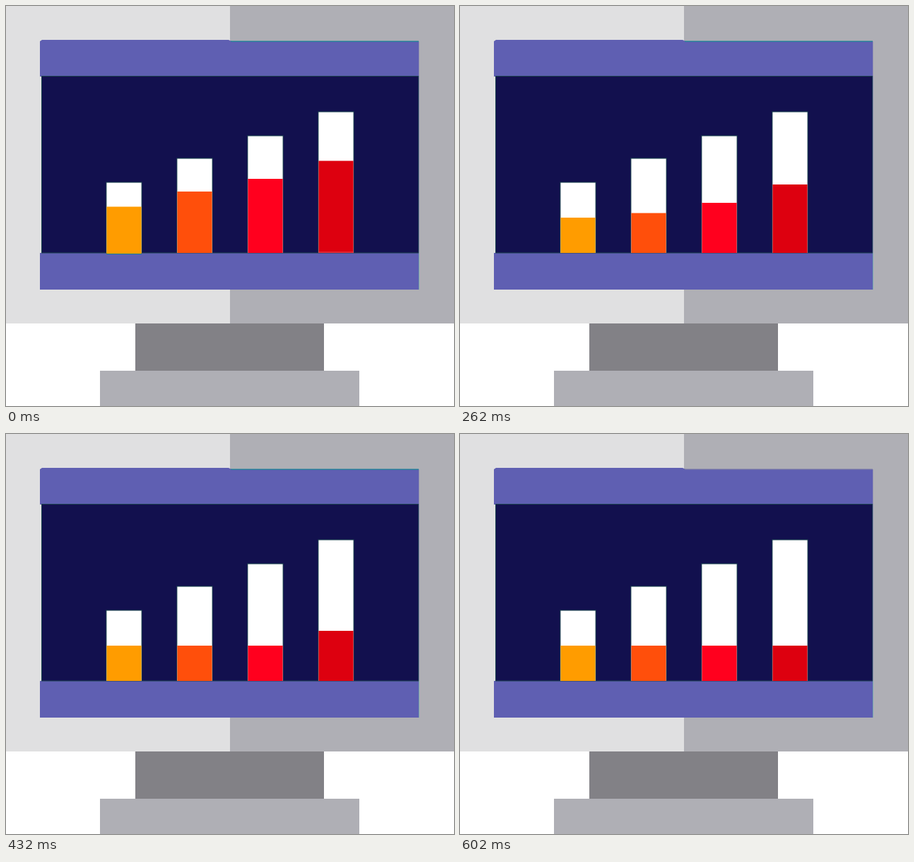
An HTML page with a canvas that plays this animation: 634 by 567 pixels, repeating every 670 ms.

```html
<!DOCTYPE html>
<html>
<head>
<meta charset="utf-8">
<style>
html, body { margin: 0; width: 100%; height: 100%; overflow: hidden; background: #fff; }
canvas { display: block; }
</style>
</head>
<body>
<canvas id="stage" width="634" height="567"></canvas>
<script>
const ctx = document.getElementById('stage').getContext('2d');
const LOOP = 670;
const STEPS = [160, 330, 500, LOOP]; // end time of each pose
const BASE = 350;
const EDGE = '#1c4350';

// x, top of the white bar, fill colour, top of the fill in each pose
const BARS = [
  [142, 250, '#ff9c00', [284.5, 300, 300, 300]],
  [242, 216, '#ff4f0b', [263, 293.5, 300, 300]],
  [342, 184, '#ff001e', [245, 279, 300, 300]],
  [442, 150, '#dd000f', [219.5, 253, 279, 300]]
];

function box(color, x1, y1, x2, y2) {
  ctx.fillStyle = color;
  ctx.fillRect(x1, y1, x2 - x1, y2 - y1);
}

function poly(color, ...points) {
  ctx.fillStyle = color;
  ctx.beginPath();
  points.forEach(([x, y]) => ctx.lineTo(x, y));
  ctx.fill();
}

function drawMonitor(pose) {
  box('#fff', 0, 0, 634, 567);
  box('#e0e0e1', 0, 0, 317, 450);
  box('#afafb5', 317, 0, 634, 450);
  box('#828186', 183, 450, 450, 517);
  box('#afafb5', 133, 517, 500, 567);

  box('#12104e', 50, 99, 584, 351);
  box(EDGE, 50, 99, 51, 350);
  box(EDGE, 583.3, 99, 584.3, 350);

  poly('#5f5fb2', [48, 50], [51, 48], [315, 48], [319, 50], [584, 50], [584, 100], [48, 100]);
  box(pose < 3 ? '#128494' : '#7474a6', 318, 49.5, 584, 50.7);
  box('#5f5fb2', 48, 350, 584, 402);
  box('#8080b0', 584, 50, 584.6, 350);
  box('#62a4a9', 584, 350, 584.7, 402);
  box(EDGE, 50, 99, 584, 100);
  box(EDGE, 50, 349.5, 584, 350.5);
}

function drawBar([x, top, color, levels], pose) {
  box(EDGE, x - 0.6, top - 0.6, x + 50.6, BASE);
  box('#fff', x + 0.4, top + 0.5, x + 49.6, BASE);
  box(color, x + 0.4, levels[pose], x + 49.6, BASE);
}

function draw(now) {
  const t = now % LOOP;
  const pose = STEPS.findIndex(end => t < end);
  drawMonitor(pose);
  BARS.forEach(bar => drawBar(bar, pose));
  if (pose === 0) {
    box('#ff9c00', 142.4, 349, 191.6, 351);
    box('#1a8088', 142, 351, 192, 352);
    box('#e8505a', 442.4, 348.5, 491.6, 349.5);
  }
  requestAnimationFrame(() => draw(performance.now() - start));
}

const start = performance.now();
draw(0);
</script>
</body>
</html>
```
